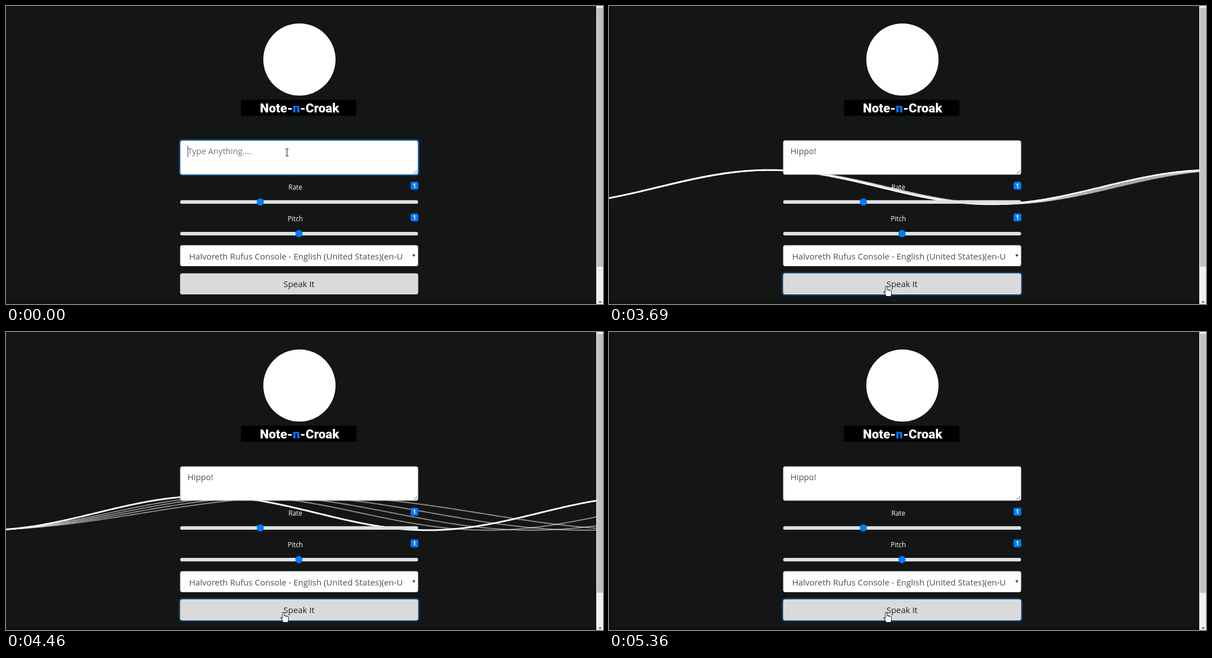
Write an HTML page with a canvas that moves like this. It is 1058 by 529 pixels and loops after 5410 ms.

```html
<!DOCTYPE html>
<html lang="en">
<head>
<meta charset="utf-8">
<title>Text to speech</title>
<style>
  html, body { margin: 0; width: 100%; height: 100%; overflow: hidden; background: #141615; }
  canvas { display: block; width: 1058px; height: 529px; }
</style>
</head>
<body>
<canvas id="stage"></canvas>
<script>
const W = 1058, H = 529, LOOP = 5410, STEP = 65;
const SANS = '"Open Sans", "Noto Sans", sans-serif';
const BLUE = '#007bff', BG = '#141615';
const LEFT = 309, WIDTH = 421;

// Key moments in ms
const KEYS = [80, 380, 710, 890, 1000, 1690];
const HAND_ON = 2820, FOCUS_SWAP = 2950, WAVE_ON = 3510, WAVE_OFF = 5360;
const TYPED = 'Hippo!';

const canvas = document.getElementById('stage');
const ctx = canvas.getContext('2d');
const dpr = window.devicePixelRatio || 1;
canvas.width = W * dpr;
canvas.height = H * dpr;

// The screen refreshes in even steps; motion holds between them
const hold = t => 4200 + Math.floor((t - 4198) / STEP) * STEP;

function smooth(u) {
  u = Math.min(1, Math.max(0, u));
  return u * u * (3 - 2 * u);
}

function rect(x, y, w, h, fill, r = 0) {
  ctx.beginPath();
  ctx.roundRect(x, y, w, h, r);
  ctx.fillStyle = fill;
  ctx.fill();
}

function disc(x, y, r, fill) {
  ctx.beginPath();
  ctx.arc(x, y, r, 0, Math.PI * 2);
  ctx.fillStyle = fill;
  ctx.fill();
}

function poly(points, fill) {
  ctx.beginPath();
  points.forEach(([x, y]) => ctx.lineTo(x, y));
  ctx.closePath();
  ctx.fillStyle = fill;
  ctx.fill();
}

function text(str, x, y, size, fill, align = 'left', weight = 400, family = SANS) {
  ctx.font = `${weight} ${size}px ${family}`;
  ctx.textAlign = align;
  ctx.fillStyle = fill;
  ctx.fillText(str, x, y);
  return ctx.measureText(str).width;
}

function box(y, h, fill, border, focused) {
  if (focused) rect(LEFT - 3, y - 3, WIDTH + 6, h + 6, 'rgba(0,123,255,0.33)', 6);
  rect(LEFT - 0.5, y - 0.5, WIDTH + 1, h + 1, border, 4);
  rect(LEFT + 0.5, y + 0.5, WIDTH - 1, h - 1, fill, 3);
}

function drawHeader() {
  disc(520, 95, 64, '#fff');
  rect(416.5, 166.5, 204.5, 28.5, '#000');
  let x = 450;
  for (const part of ['Note-', 'n', '-Croak'])
    x += text(part, x, 188.7, 22.4, part === 'n' ? BLUE : '#fff', 'left', 900, 'Roboto, sans-serif');
}

// One strong sine and four faint ones whose wavelengths drift apart
function drawWaves(t) {
  const u = t - 3680;
  const phase = 85 - 1.009 * u - 35 * Math.exp(-u / 200);
  const spread = Math.max(0, 0.293 * Math.sin((t - 3610) / 1500));
  ctx.save();
  ctx.beginPath();
  ctx.rect(0, 0, 1046, H);
  ctx.clip();
  ctx.lineJoin = 'round';
  for (let i = 4; i >= 0; i--) {
    const turn = 0.4584 - (i ? spread * (0.15 + 0.2125 * i) : 0);
    ctx.beginPath();
    for (let x = -4; x <= 1050; x += 3)
      ctx.lineTo(x, 321.5 + 30.3 * Math.cos((turn * x + phase) * Math.PI / 180));
    ctx.strokeStyle = i ? 'rgba(255,255,255,0.52)' : '#fafafa';
    ctx.lineWidth = i ? 1.9 : 3;
    ctx.stroke();
  }
  ctx.restore();
}

function drawTextarea(t) {
  const focused = t < FOCUS_SWAP;
  box(239, 60, '#fff', focused ? '#80bdff' : '#ced4da', focused);
  const typed = TYPED.slice(0, KEYS.filter(k => t >= k).length);
  const w = typed ? text(typed, 321.5, 263.3, 14.8, '#495057') : 0;
  if (!typed) text('Type Anything....', 322, 263.3, 14.7, '#6c757d');

  const blink = (t >= 1580 && t < 1690) || (t >= 2240 && t < HAND_ON);
  if (focused && !blink) rect(321.8 + w, 248, 1, 20, '#333');

  ctx.strokeStyle = '#666';
  ctx.lineWidth = 0.9;
  ctx.beginPath();
  for (const d of [7, 3.5]) {
    ctx.moveTo(729 - d, 298);
    ctx.lineTo(729, 298 - d);
  }
  ctx.stroke();
}

function drawSlider(label, y, knob) {
  text(label, 512.8, y - 22.3, 11.8, '#fff', 'center', 500);
  rect(717, y - 36, 13.7, 14, BLUE, 3);
  text('1', 723.9, y - 25.3, 9.8, '#fff', 'center', 700);
  rect(LEFT - 0.3, y - 3.3, WIDTH + 0.6, 6.4, '#dee2e6', 3.2);
  disc(knob, y - 0.2, 6.4, BLUE);
}

function drawSelect() {
  box(425, 36.5, '#fff', '#ced4da', false);
  text('Halvoreth Rufus Console - English (United States)(en-U', 324.5, 449.8, 15, '#495057');
  poly([[720.2, 441], [725.4, 441], [722.8, 445.6]], '#343a40');
}

function drawButton(t) {
  box(475, 36.5, '#dadada', '#dadada', t >= FOCUS_SWAP);
  text('Speak It', 519.3, 499.3, 14.9, '#212529', 'center');
}

function drawScrollbar() {
  rect(1046, 0, 12, H, '#f1f1f1');
  rect(1047, 3, 11, 460, '#c1c1c1');
  poly([[1049.8, 524.5], [1055.8, 524.5], [1052.8, 527.6]], '#505050');
}

function drawBeam(x, y) {
  rect(x - 0.55, y - 6, 1.1, 12, '#222');
  for (const end of [-6.2, 6.2]) rect(x - 2.8, y + end - 0.5, 5.6, 1, '#222');
}

// Fills a white outline shape with a dark rim
function drawPointer(x, y, trace) {
  ctx.save();
  ctx.translate(x, y);
  ctx.beginPath();
  trace();
  ctx.strokeStyle = '#111';
  ctx.lineWidth = 1.8;
  ctx.lineJoin = 'round';
  ctx.stroke();
  ctx.fillStyle = '#fff';
  ctx.fill();
  ctx.restore();
}

function traceArrow() {
  ctx.moveTo(0, 0);
  for (const [x, y] of [[0, 13], [3, 10.2], [5, 14.8], [7, 14], [5, 9.5], [9, 9.3]]) ctx.lineTo(x, y);
  ctx.closePath();
}

function traceHand() {
  ctx.roundRect(-1, 0, 2.2, 10, 1.1);
  for (let i = 1; i < 4; i++) ctx.roundRect(2.5 * i - 1, 5 + 0.7 * i, 2.2, 6, 1.1);
  ctx.roundRect(-1, 8.5, 9.8, 8.5, [0, 0, 3, 3]);
  ctx.moveTo(-1, 10.8);
  ctx.lineTo(-3.8, 9.3);
  ctx.lineTo(-1, 14);
}

function drawCursor(t, held) {
  if (t >= HAND_ON) return drawPointer(491.3, 498, traceHand);
  const u = smooth((held - 2210) / 590);
  const x = 498 - 4 * u, y = 260 + 238 * u;
  if (y < 299) drawBeam(x, y);
  else drawPointer(x, y, traceArrow);
}

function draw(t) {
  const held = hold(t);
  ctx.setTransform(dpr, 0, 0, dpr, 0, 0);
  rect(0, 0, W, H, BG);
  rect(0, 524.5, W, 4.5, '#0f1110');
  drawHeader();
  if (t >= WAVE_ON && t < WAVE_OFF) drawWaves(held);
  drawTextarea(t);
  drawSlider('Rate', 348, 450.7);
  drawSlider('Pitch', 404.2, 519.2);
  drawSelect();
  drawButton(t);
  drawScrollbar();
  drawCursor(t, held);
}

const start = performance.now();
function tick() {
  draw((performance.now() - start) % LOOP);
  requestAnimationFrame(tick);
}
tick();
</script>
</body>
</html>
```
